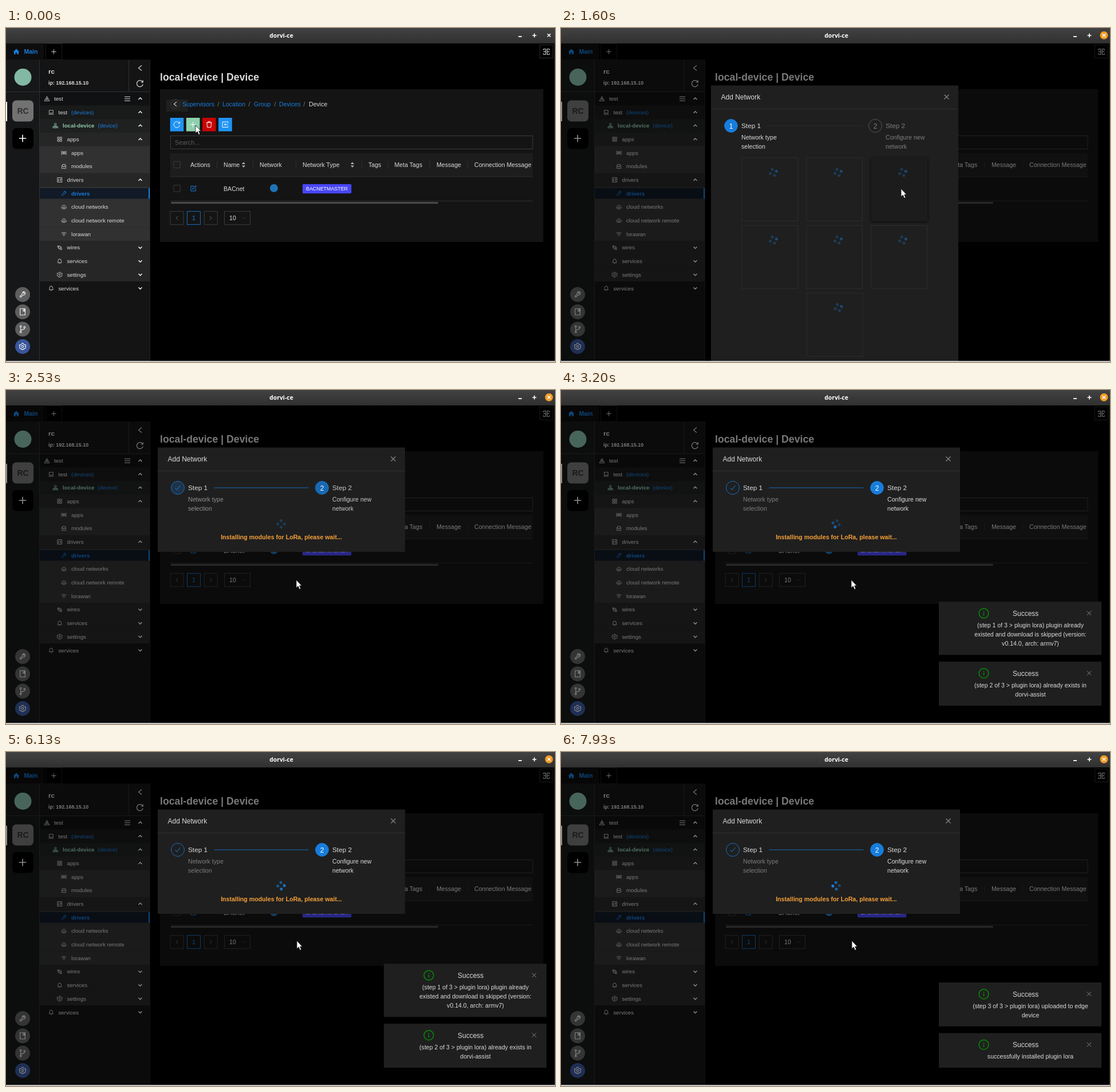
Write an HTML page that moves like this. It is 959x584 px and loops after 8 s.

```html
<!DOCTYPE html>
<html lang="en">
<head>
<meta charset="utf-8">
<title>Add network</title>
<style>
html, body { margin: 0; width: 100%; height: 100%; overflow: hidden; background: #000; }
svg { display: block; width: 959px; height: 584px; }
text { font-family: "Liberation Sans", Arial, sans-serif; white-space: pre; }
</style>
</head>
<body>
<svg id="stage" viewBox="0 0 959 584"></svg>
<script>
const BLUE = '#177ddc', TEXT = '#dbdbdb', DIM = '#7d7d7d', LINE = '#303030', EDGE = '#434343';
const LOOP = 8000;

// ---- markup helpers; text is placed by its vertical centre ----
const text = (x, y, s, size = 10.6, fill = TEXT, extra = '') =>
  `<text x="${x}" y="${y + size * .36}" font-size="${size}" fill="${fill}" ${extra}>${s}</text>`;
const BOLD = 'font-weight="700"', MID = 'text-anchor="middle"';
const rect = (x, y, w, h, fill, extra = '') =>
  `<rect x="${x}" y="${y}" width="${w}" height="${h}" fill="${fill}" ${extra}/>`;
const box = (x, y, w, h, stroke = EDGE, extra = '') =>
  rect(x, y, w, h, 'none', `stroke="${stroke}" stroke-width=".85" ${extra}`);
const circle = (x, y, r, fill, extra = '') => `<circle cx="${x}" cy="${y}" r="${r}" fill="${fill}" ${extra}/>`;
const path = (x, y, d, stroke = TEXT, width = 1, scale = 1) =>
  `<path transform="translate(${x} ${y}) scale(${scale})" d="${d}" fill="none" stroke="${stroke}" stroke-width="${width}"/>`;
const group = (id, body, extra = '') => `<g id="${id}" ${extra}>${body}</g>`;

// ---- icons, centred on 0,0 ----
const ICON = {
  plus: 'M-5 0H5M0-5V5',
  cross: 'M-4-4L4 4M-4 4L4-4',
  up: 'M-3 1.5L0-1.5L3 1.5',
  down: 'M-3-1.5L0 1.5L3-1.5',
  left: 'M3-4.5L-2.5 0L3 4.5',
  right: 'M-3-4.5L2.5 0L-3 4.5',
  menu: 'M-5-3.5H5M-5 0H5M-5 3.5H5',
  check: 'M-5 0L-1.5 4L5-4.5',
  reload: 'M4.8-2.5A5.5 5.5 0 1 0 5.3 1.5M5.2-5.5V-2H1.7',
  trash: 'M-5-3.5H5M-2-3.5V-5.5H2V-3.5M-4-3.5L-3.4 5H3.4L4-3.5',
  exit: 'M5-2.5V-5H-5V5H5V2.5M5 0H-1.5M.8-2.3L-1.6 0L.8 2.3',
  edit: 'M1-4H-4.5V4.5H4V0M-1.5 1.5L-1-1L4-5L5-3.7L.5 1Z',
  split: 'M-5-4.5H-1.2V4.5H-5M5-4.5H1.2V4.5H5M-5 0H-1.2M5 0H1.2M-5-4.5V-2.5M-5 4.5V2.5M5-4.5V-2.5M5 4.5V2.5',
  warn: 'M0-4.5L5 4.5H-5ZM-2.4 1H2.4M0-1.5V3',
  laptop: 'M-3.8-3.8H3.8V2H-3.8ZM-5.2 4.2H5.2',
  tree: 'M-1.8-4.5H1.8V-1.5H-1.8ZM0-1.5V.8M-3.6 2V.8H3.6V2M-5 2H-2.4V4.5H-5ZM-1.3 2H1.3V4.5H-1.3ZM2.4 2H5V4.5H2.4Z',
  grid: 'M-4.2-4.2H-.8V-.8H-4.2ZM.8-4.2H4.2V-.8H.8ZM-4.2 .8H-.8V4.2H-4.2ZM.8 .8H4.2V4.2H.8Z',
  bars: 'M-4.5-4V4M4.5-4V4M-2.5-2.5H-.8V2.5H-2.5ZM.8-2.5H2.5V2.5H.8Z',
  crate: 'M-4 4.2V-1L-2.5-4H2.5L4-1V4.2ZM-4-1H-1.5V1H1.5V-1H4',
  sliders: 'M-4.5-4.5H4.5V4.5H-4.5ZM-2-3V3M2-3V3M-3.2 1H-.8M.8-1H3.2',
  wrench: 'M4-3.5L2-1.7L1-2.7L2.7-4.4A3 3 0 0 0-.7-.6L-4.5 3L-3 4.5L.7 .8A3 3 0 0 0 4-3.5Z',
  cloud: 'M-3 3.5A2.5 2.5 0 0 1-3.5-1A3.7 3.7 0 0 1 3.5-1A2.5 2.5 0 0 1 3 3.5M-1.8 .5H1.8V3.8H-1.8Z',
  wifi: 'M-5-1.5A7.5 7.5 0 0 1 5-1.5M-3.2 .6A5 5 0 0 1 3.2 .6M-1.5 2.5A2.3 2.3 0 0 1 1.5 2.5M-.4 4H.4',
  wires: 'M-4-3.5H-1V-1H-4ZM-2.5-1V2H1M1 .5H4V4H1ZM-1-2.3H2.5V.5',
  bell: 'M-4.2 3H4.2M-3.2 3V-.8A3.2 3.2 0 0 1 3.2-.8V3M-1 4.6H1M0-4V-5',
  gear: 'M-1-5H1L1.5-3.6L3.4-2.6L4.7-3L5.2-.8L4 0L5 1.8L3.4 3.6L1.6 3.4L1 5H-1L-1.6 3.4L-3.4 3.6L-5 1.8L-4 0L-5.2-.8L-4.7-3L-3.4-2.6L-1.5-3.6ZM-1.6 0A1.6 1.6 0 1 0 1.6 0A1.6 1.6 0 1 0-1.6 0',
  book: 'M-4-5H4V5H-4ZM1-5V-1L2-2L3-1V-5',
  branch: 'M-3-3V3M-3 2C-3 0 3 1.5 3-1.5M-4.3-4.5A1.3 1.3 0 1 0-1.7-4.5A1.3 1.3 0 1 0-4.3-4.5M-4.3 4.5A1.3 1.3 0 1 0-1.7 4.5A1.3 1.3 0 1 0-4.3 4.5M1.7-3A1.3 1.3 0 1 0 4.3-3A1.3 1.3 0 1 0 1.7-3',
  home: 'M0-5L5.5 .2H4V4.6H1.2V1.5H-1.2V4.6H-4V.2H-5.5Z'
};
const icon = (name, x, y, stroke, width, scale) => path(x, y, ICON[name], stroke, width, scale);

// ---- window frame ----
function titleBar() {
  return rect(0, 0, 959, 27, 'url(#bar)') +
    text(481, 13, 'dorvi-ce', 10.4, '#fff', `${BOLD} ${MID} style="font-family:'Noto Sans',sans-serif"`) +
    path(898, 15, 'M-3 0H3', '#fff', 1.8) + path(923, 13, 'M-3.5 0H3.5M0-3.5V3.5', '#fff', 1.6) +
    circle(948.5, 12.8, 7, '#f19a24', 'id="closeHover"') + icon('cross', 948.5, 12.8, '#fff', 2, .7);
}

function tabBar() {
  return rect(0, 27, 959, 29, '#000') + rect(0, 27, 66, 29, '#0d0d0d') +
    `<path transform="translate(18 41.5)" d="${ICON.home}" fill="${BLUE}"/>` +
    text(31.5, 41.5, 'Main', 10.5, BLUE, BOLD) +
    box(69.5, 27.5, 28, 28, '#222') + icon('plus', 83.5, 41.5, TEXT, 1, .85) +
    rect(0, 55.5, 252, 1, '#222') +
    box(932.5, 29.5, 23, 23, '#333') + icon('split', 944, 41.5, TEXT, 1, 1.05);
}

function rail() {
  const tools = ['wrench', 'book', 'branch', 'gear'];
  return rect(0, 56, 58, 526, '#161718') + circle(29.5, 86, 15, '#83b8a5') + rect(0, 111, 58, 1, LINE) +
    rect(0, 129, 2, 34, '#fff') + rect(11, 126.5, 37, 37, '#727272', 'rx="7"') +
    text(29.5, 145, 'RC', 14, '#303030', `${BOLD} ${MID}`) +
    rect(11, 175, 37, 36.5, '#000', 'rx="7"') + icon('plus', 29, 193, '#fff', 1.3, 1.25) +
    tools.map((name, i) => circle(29, 466 + i * 30.3, 13, i === 3 ? '#39569b' : '#5e5e5e') +
      icon(name, 29, 466 + i * 30.3, '#eee', 1, 1.1)).join('');
}

// label, icon, depth, chevron, suffix, suffix x
const ROWS = [
  ['test', 'warn', 0, 'up'],
  ['test', 'laptop', 1, 'up', '(devices)', 114],
  ['local-device', 'tree', 2, 'up', '(device)', 160.5],
  ['apps', 'grid', 3, 'up'], ['apps', 'bars', 4], ['modules', 'crate', 4],
  ['drivers', 'sliders', 3, 'up'], ['drivers', 'wrench', 4], ['cloud networks', 'cloud', 4],
  ['cloud network remote', 'cloud', 4], ['lorawan', 'wifi', 4],
  ['wires', 'wires', 3, 'down'], ['services', 'bell', 3, 'down'], ['settings', 'gear', 3, 'down'],
  ['services', 'bell', 1, 'down']
];
const DEPTH_FILL = ['#101112', '#191a1a', '#1f2020', '#262626', '#313131'];

function treeRow([label, name, depth, chevron, suffix, suffixX], i) {
  const y = 123.5 + i * 23.68, selected = i === 7, device = i === 2;
  const color = selected ? BLUE : device ? '#8fc9ae' : TEXT;
  const fill = i === 14 ? '#141414' : DEPTH_FILL[depth];
  return rect(59, y - 11.84, 192, 23.9, fill) +
    (selected ? rect(59, y - 9.3, 192, 18.6, '#111a26') + rect(249, y - 9.3, 2, 18.6, BLUE) : '') +
    icon(name, 71.5 + depth * 7.4, y, color, .9, .88) +
    text(84 + depth * 7.5, y, label, 9.7, color, selected || device ? BOLD : '') +
    (suffix ? text(suffixX, y, suffix, 9.7, BLUE) : '') +
    (chevron ? icon(chevron, 234.5, y, '#fff', 1.4) : '');
}

function sidebar() {
  return rect(58, 56, 194, 526, '#141414') + rect(58, 56, 1, 526, LINE) +
    text(74, 75.5, 'rc', 11.6, TEXT, BOLD) + text(74, 95.5, 'ip: 192.168.15.10', 8.9, TEXT, BOLD) +
    rect(214, 56, 1, 55, LINE) + icon('left', 234, 70, TEXT, 1.1) + icon('reload', 234, 97, TEXT, 1.2) +
    ROWS.map(treeRow).join('') + icon('menu', 212, 123.8, TEXT, 1.1) +
    rect(59, 111, 192, 1, LINE) + rect(251, 56, 1, 526, '#202020');
}

// ---- device page ----
function devicePage() {
  const crumbs = [['Supervisors', 308], ['Location', 378], ['Group', 433], ['Devices', 477]];
  const heads = [['Actions', 322], ['Name', 380], ['Network', 443], ['Network Type', 518], ['Tags', 633],
    ['Meta Tags', 678.5], ['Message', 752], ['Connection Message', 818]];
  const buttons = [['reload', '#1f93f5'], ['plus', '#8dd0ad'], ['trash', '#c80404'], ['exit', '#1f93f5']];
  const sorter = x => `<path d="M${x - 3} 238h6l-3-3.6zM${x - 3} 240.5h6l-3 3.6z" fill="#b5b5b5"/>`;
  const checkbox = y => box(293, y - 5.7, 11.4, 11.4, EDGE, 'rx="1"');
  return text(269, 85.5, 'local-device | Device', 17.7, TEXT, BOLD) +
    rect(269, 107, 669.5, 267, '#141414') +
    rect(280, 125, 37.5, 21, '#1f1f1f', 'id="ghost"') + circle(295.5, 133, 8.5, '#242424', 'stroke="#333"') +
    icon('left', 295.5, 133, TEXT, 1.2, .85) +
    crumbs.map(([s, x]) => text(x, 133.2, s, 10.6, BLUE)).join('') +
    [371, 425, 470, 521].map(x => text(x, 133.2, '/', 10.6, DIM, MID)).join('') + text(529, 133.2, 'Device') +
    buttons.map(([name, fill], i) => rect(286.7 + i * 28.15, 157, 23.65, 23.65, fill) +
      icon(name, 298.5 + i * 28.15, 168.8, '#fff', 1, .95)).join('') +
    box(287.5, 188.5, 632.5, 23) + text(295, 200, 'Search...', 10.6, '#5c5c5c', 'letter-spacing=".1"') +
    rect(287, 219, 633, 41, '#1d1d1d') + rect(287, 259.5, 633, 1, LINE) + checkbox(239) +
    heads.map(([s, x]) => text(x, 239, s)).join('') + sorter(415) + sorter(605) +
    [368, 431, 506, 621, 667, 740, 806].map(x => rect(x, 233, 1, 12, LINE)).join('') +
    checkbox(280.5) + icon('edit', 327.5, 280.5, BLUE) + text(380, 281, 'BACnet') +
    circle(468, 280, 7, '#1f73b5') + rect(518, 273, 85.3, 16.3, '#4846f5', 'rx="1.5"') +
    text(560.5, 281.2, 'BACNETMASTER', 8.9, '#fff', MID) + rect(287, 302, 633, 1, LINE) +
    rect(288, 304.3, 467, 2.9, '#4d4d4d', 'rx="1.4"') +
    box(287, 320.7, 23, 23) + icon('left', 298.5, 332.4, DIM, 1, .7) +
    box(316.5, 320.7, 23, 23, BLUE) + text(328, 332.4, '1', 10.6, BLUE, MID) +
    box(346.2, 320.7, 23, 23) + icon('right', 357.8, 332.4, DIM, 1, .7) +
    box(381.5, 320.7, 45, 23) + text(390, 332.4, '10') + icon('down', 415, 332.4, '#3a3a3a');
}

// ---- dialog ----
const spinner = id => group(id, [0, 1, 2, 3].map(i => {
  const a = i * Math.PI / 2;
  return circle(5.7 * Math.sin(a), -5.7 * Math.cos(a), 2.55, BLUE);
}).join(''));

const TILES = [0, 1, 2, 3, 4, 5, 6].map(i => [i === 6 ? 429.5 : 316 + i % 3 * 113, 227 + Math.floor(i / 3) * 118.2]);

function dialog() {
  const step = (n, x, lines) => circle(x, 171, 11.45, BLUE, `id="dot${n}" stroke="${BLUE}" stroke-width=".85"`) +
    text(x, 171.2, n, 12, '#fff', `${MID} id="digit${n}"`) +
    group('label' + n, text(x + 18, 170.8, 'Step ' + n, 11.8, 'inherit')) +
    group('about' + n, lines.map((s, i) => text(x + 18, 191 + i * 16.3, s, 10.6, 'inherit')).join(''));
  const tiles = TILES.map(([x, y], i) =>
    (i === 2 ? rect(x - .5, y, 99, 111, '#1c1c1c', 'id="hover" filter="url(#shadow)"') : box(x, y, 97.5, 110.5, LINE)) +
    `<use href="#tileSpin" class="tileSpin" x="${x + 55}" y="${y + 25.5}"/>`).join('');
  return rect(262, 100.5, 432, 484, '#1f1f1f', 'id="body"') + rect(262, 141, 432, 1, LINE) +
    text(279.5, 120.5, 'Add Network', 12) + icon('cross', 673.5, 120.5, '#8a8a8a', 1.1) +
    step(1, 297, ['Network type', 'selection']) + step(2, 549, ['Configure new', 'network']) +
    `<path id="track" d="M360.5 171H525.5" stroke-width=".85"/>` + group('tick', icon('check', 297, 171, BLUE, 1.1, .9)) +
    group('choose', tiles) +
    group('install', `<g transform="translate(477.5 234)">${spinner('waitSpin')}</g>` +
      text(478, 257, 'Installing modules for LoRa, please wait...', 10.65, '#f5a03a', `${BOLD} ${MID}`));
}

// ---- notifications: start, end, height, lines ----
const NOTES = [
  [2650, 7150, 93, ['(step 1 of 3 > plugin lora) plugin already', 'existed and download is skipped (version:', 'v0.14.0, arch: armv7)']],
  [2740, 7250, 77, ['(step 2 of 3 > plugin lora) already exists in', 'dorvi-assist']],
  [6345, 1e5, 76.7, ['(step 3 of 3 > plugin lora) uploaded to edge', 'device']],
  [6383, 1e5, 60.5, ['successfully installed plugin lora']]
];
const note = ([, , height, lines], i) => group('note' + i,
  rect(660, 0, 284, height, '#1f1f1f') + circle(738.5, 20.3, 8.4, 'none', 'stroke="#0a830a" stroke-width="1.6"') +
  path(738.5, 20.3, 'M0-4V-2.4M0-1V4', '#0a830a', 1.6) + text(789, 20.3, 'Success', 12) +
  icon('cross', 922.5, 20, '#8a8a8a', 1.1, .9) +
  lines.map((s, k) => text(820, 40.8 + k * 16.25, s.replace('>', '&gt;'), 10.57, TEXT, MID)).join(''));

const stage = document.getElementById('stage');
stage.innerHTML = `<defs>
  <linearGradient id="bar" x2="0" y2="1"><stop stop-color="#424242"/><stop offset="1" stop-color="#303030"/></linearGradient>
  <filter id="shadow" x="-20%" y="-20%" width="140%" height="140%"><feDropShadow dx="0" dy="1" stdDeviation="2.5" flood-opacity=".7"/></filter>
  ${spinner('tileSpin')}</defs>` +
  rect(0, 0, 959, 584, '#000') + tabBar() + rail() + sidebar() + devicePage() +
  rect(0, 27, 959, 555, '#000', 'id="mask"') + group('dialog', dialog()) + NOTES.map(note).join('') +
  titleBar() + rect(958, 27, 1, 555, '#333') + rect(0, 582, 959, 2, '#c4c4c4') +
  `<path id="cursor" d="M0 0V14L3.2 11L5.6 16.5L7.9 15.4L5.6 10.2H9.6Z" fill="#fff" stroke="#111" stroke-width=".8"/>`;

// ---- motion ----
const $ = id => document.getElementById(id);
const set = (id, attrs) => { for (const k in attrs) $(id).setAttribute(k, attrs[k]); };
const show = (id, on) => set(id, { visibility: on ? 'visible' : 'hidden' });
const span = (t, start, length) => Math.min(1, Math.max(0, (t - start) / length));
const easeOut = u => 1 - (1 - u) ** 2.4;
const easeInOut = u => u < .5 ? 4 * u ** 3 : 1 - 4 * (1 - u) ** 3;
const smooth = u => u * u * (3 - 2 * u);
const grey = u => { const v = Math.round(125 + 94 * u); return `rgb(${v},${v},${v})`; };

const CURSOR = [[0, 331, 170], [1130, 331, 170], [1600, 594, 281], [1870, 567, 293], [2130, 457, 259],
  [2330, 457, 259], [2500, 507, 332], [3500, 507, 332], [3560, 508, 330], [LOOP, 508, 330]];
function cursorAt(t) {
  const i = CURSOR.findIndex(k => k[0] > t), [t0, x0, y0] = CURSOR[i - 1], [t1, x1, y1] = CURSOR[i];
  const u = smooth((t - t0) / (t1 - t0));
  return [x0 + (x1 - x0) * u, y0 + (y1 - y0) * u];
}

function spin(id, age) {
  age = Math.max(0, age);
  set(id, { transform: `rotate(${age * .3})` });
  [...$(id).children].forEach((dot, i) => {
    const wave = 1 - Math.abs(1 - Math.max(0, age / 1000 - i * .4) % 2);
    dot.setAttribute('opacity', .3 + .7 * wave);
  });
}

function drawDialog(t) {
  const open = easeOut(span(t, 1100, 250)), second = t >= 2390, p = easeOut(span(t, 2390, 300));
  const zoom = .2 + .8 * open;
  set('mask', { opacity: .45 * open });
  set('dialog', {
    opacity: open,
    transform: open < 1 ? `translate(331 171) scale(${zoom}) translate(-331 -171)` : `translate(${second ? 3 : 0})`
  });
  set('body', { height: second ? 182.5 : 484 });
  set('dot1', { 'fill-opacity': 1 - p });
  set('dot2', { 'fill-opacity': p, stroke: second ? BLUE : '#5f5f5f' });
  set('digit2', { fill: second ? '#fff' : DIM });
  set('track', { stroke: second ? BLUE : LINE });
  set('label1', { fill: TEXT });
  set('about1', { fill: grey(1 - p) });
  set('label2', { fill: grey(p) });
  set('about2', { fill: grey(p) });
  show('digit1', !second);
  show('tick', second);
  set('choose', { display: second ? 'none' : 'inline' });
  set('install', { display: second ? 'inline' : 'none' });
  set('hover', { opacity: t > 1480 && t < 2000 ? 1 : 0 });
  document.querySelectorAll('.tileSpin').forEach(s => s.setAttribute('display', t < 1830 ? 'inline' : 'none'));
  spin('tileSpin', t - 1365);
  spin('waitSpin', t - 2545);
}

function drawNotes(t) {
  let bottom = 552;
  for (let i = NOTES.length - 1; i >= 0; i--) {
    const [start, end, height] = NOTES[i], enter = easeInOut(span(t, start, 240));
    const top = bottom - height;
    set('note' + i, {
      transform: `translate(${284 * (1 - enter)} ${top})`,
      opacity: enter * (1 - span(t, end, 200))
    });
    if (t >= start) bottom = top - 11.8;
  }
}

function render(t) {
  set('ghost', { opacity: 1 - span(t, 60, 70) });
  show('closeHover', t >= 1100);
  drawDialog(t);
  drawNotes(t);
  set('cursor', { transform: `translate(${cursorAt(t)})` });
}

const began = performance.now();
function tick() {
  render((performance.now() - began) % LOOP);
  requestAnimationFrame(tick);
}
tick();
</script>
</body>
</html>
```
